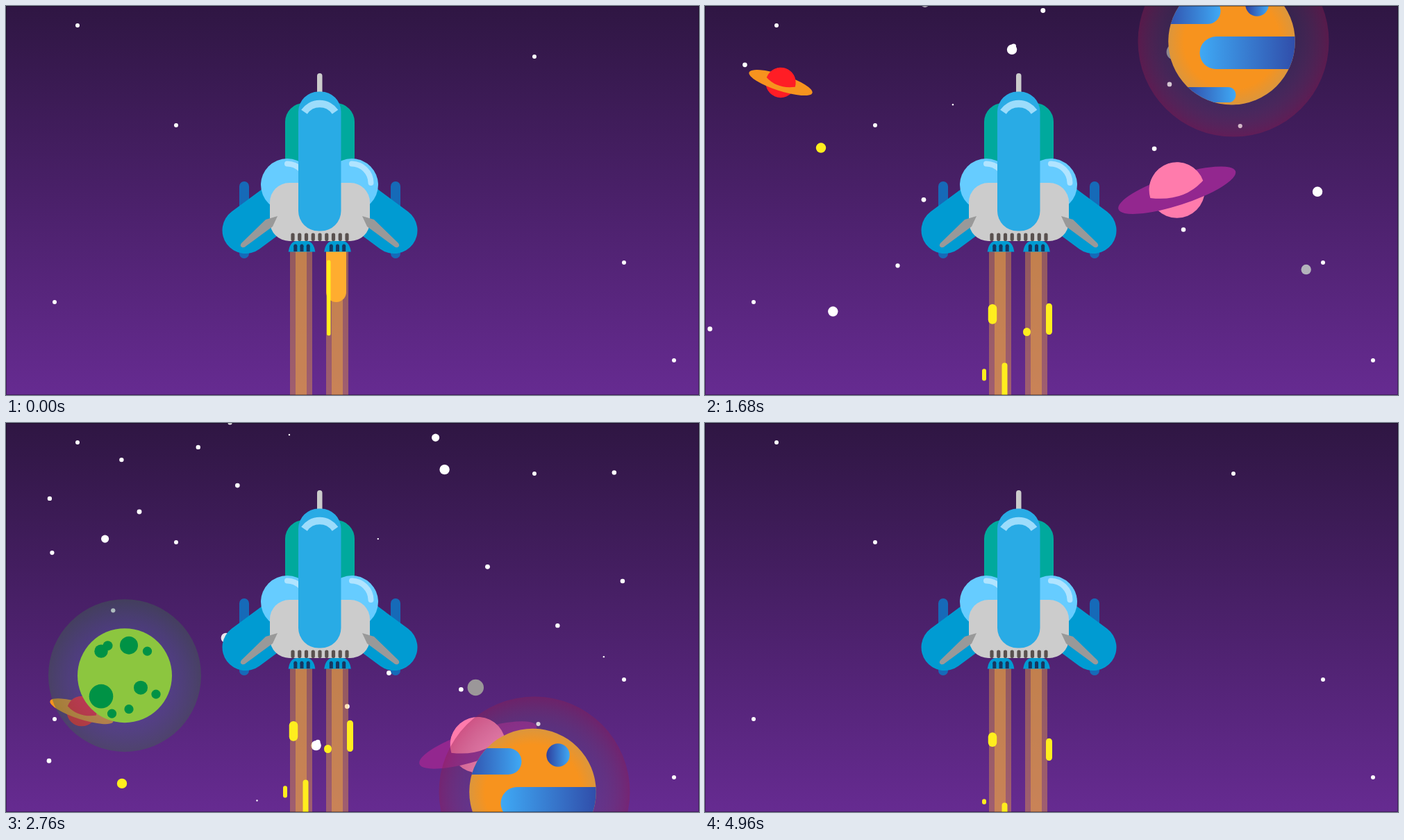
An HTML page that plays this animation: 998 by 561 pixels, repeating every 5000 ms.

```html
<!DOCTYPE html>
<html lang="en">
<head>
<meta charset="utf-8">
<title>Rocket flight</title>
<style>
html, body { margin: 0; width: 100%; height: 100%; overflow: hidden; background: #2f1642; }
svg { display: block; width: 100%; height: 100%; }
</style>
</head>
<body>
<svg viewBox="0 0 998 561" preserveAspectRatio="none">
  <defs>
    <linearGradient id="sky" x2="0" y2="1">
      <stop stop-color="#2f1643"/><stop offset="1" stop-color="#662b91"/>
    </linearGradient>
    <linearGradient id="sea">
      <stop stop-color="#3fa9f5"/><stop offset="1" stop-color="#2e3f9e"/>
    </linearGradient>
    <linearGradient id="bay">
      <stop stop-color="#2e3f9e"/><stop offset="1" stop-color="#3fa9f5"/>
    </linearGradient>
    <radialGradient id="sun">
      <stop offset=".75" stop-color="#f7931e"/><stop offset="1" stop-color="#dc963c"/>
    </radialGradient>
    <radialGradient id="warmHalo">
      <stop offset=".66" stop-color="#5a5a78" stop-opacity=".2"/>
      <stop offset="1" stop-color="#8c1e50" stop-opacity=".42"/>
    </radialGradient>
    <radialGradient id="coolHalo">
      <stop offset=".6" stop-color="#50649b" stop-opacity=".4"/>
      <stop offset="1" stop-color="#3c6450" stop-opacity=".45"/>
    </radialGradient>
    <clipPath id="disc"><circle r="91.3"/></clipPath>
    <g id="ringed">
      <circle r="40"/>
      <ellipse rx="88.6" ry="21.6" transform="rotate(-18)" style="fill:var(--ring)"/>
      <path d="M-38.4 11.2A40 40 0 0 1 37.5 -14Q10 17 -38.4 11.2Z"/>
    </g>
    <g id="wing">
      <rect x="336" y="253" width="14" height="111" rx="7" fill="#166ab8"/>
      <path d="M345 323.5L405 279" stroke="#009bd2" stroke-width="67" stroke-linecap="round"/>
    </g>
    <path id="strut" fill="#999" d="M391 303L374 308L339 342Q336 346 340 348Q343 349 346 346L384 318Z"/>
    <g id="bulb">
      <circle r="38" fill="#66ccff"/>
      <path d="M0 -30.5A28 28 0 0 1 27.5 -3" fill="none" stroke="#b0e4ff" stroke-width="8" stroke-linecap="round"/>
    </g>
    <g id="trail" fill="#fbb03b">
      <rect x="-16" y="350" width="32" height="212" opacity=".38"/>
      <rect x="-8" y="350" width="16" height="212" opacity=".45"/>
    </g>
    <g id="nozzle">
      <path d="M-19.3 354.5Q-17 339 -7 339H7Q17 339 19.3 354.5Z" fill="#009bd2"/>
      <path d="M-9.2 354V346M0 354V346M9.2 354V346" stroke="#17365f" stroke-width="5"/>
      <path d="M-9.2 346V346M0 346V346M9.2 346V346" stroke="#17365f" stroke-width="5" stroke-linecap="round"/>
    </g>
  </defs>

  <rect width="998" height="561" fill="url(#sky)"/>
  <g id="stars" fill="#fff"></g>
  <g id="dots"></g>
  <g id="pink" fill="#ff7bac" style="--ring:#93278f"><use href="#ringed"/></g>
  <g id="red" fill="#ff1d25" style="--ring:#f7931e"><use href="#ringed" transform="scale(-.54 .54)"/></g>

  <g id="orange">
    <circle cx="2.5" r="137.5" fill="url(#warmHalo)"/>
    <circle r="91.3" fill="url(#sun)"/>
    <g clip-path="url(#disc)" fill="url(#bay)">
      <rect x="-107" y="-63" width="91" height="38" rx="19"/>
      <rect x="-46" y="-7" width="160" height="47" rx="23.5" fill="url(#sea)"/>
      <rect x="-75" y="66" width="81" height="22" rx="11"/>
      <circle cx="36.5" cy="-53" r="16.7"/>
    </g>
  </g>

  <g id="green">
    <circle r="110" fill="url(#coolHalo)"/>
    <circle r="68" fill="#8cc63f"/>
    <g fill="#009245">
      <circle cx="-34" cy="-35" r="9.7"/><circle cx="-24.5" cy="-43" r="7"/>
      <circle cx="6" cy="-43.5" r="13"/><circle cx="32.5" cy="-35" r="6.6"/>
      <circle cx="-34" cy="30" r="17.3"/><circle cx="23" cy="17.5" r="10"/>
      <circle cx="45" cy="27" r="6.6"/><circle cx="-18.5" cy="55" r="6.6"/>
      <circle cx="6" cy="48.5" r="6.6"/>
    </g>
  </g>

  <use href="#trail" x="425"/>
  <use href="#trail" x="477"/>
  <g id="fire"></g>

  <use href="#wing"/>
  <use href="#wing" transform="matrix(-1 0 0 1 904 0)"/>
  <rect x="448" y="97" width="7.5" height="40" rx="3.7" fill="#ccc"/>
  <rect x="402" y="140" width="100" height="150" rx="27" fill="#00a99d"/>
  <use href="#bulb" x="405" y="258"/>
  <use href="#bulb" x="498" y="258"/>
  <use href="#nozzle" x="426"/>
  <use href="#nozzle" x="477.5"/>
  <rect x="380" y="255" width="144" height="84" rx="28" fill="#ccc"/>
  <g id="slots" fill="#59514f"></g>
  <rect x="421" y="123.5" width="61.5" height="201" rx="29" fill="#29abe5"/>
  <path d="M429.5 152.8A27 27 0 0 1 474 152.8" fill="none" stroke="#9cdcfb" stroke-width="10.5"/>
  <use href="#strut"/>
  <use href="#strut" transform="matrix(-1 0 0 1 904 0)"/>
  <rect x=".5" y=".5" width="997" height="560" fill="none" stroke="#000" stroke-opacity=".35"/>
</svg>
<script>
const LOOP = 5000, STEP = 40, BURN = 9;
const NOZZLE = 337;
const $ = id => document.getElementById(id);

function add(parent, tag, attrs) {
  const el = document.createElementNS("http://www.w3.org/2000/svg", tag);
  for (const k in attrs) el.setAttribute(k, attrs[k]);
  return $(parent).appendChild(el);
}
const dot = (parent, r, fill, cx = 0, cy = 0) => add(parent, "circle", { cx, cy, r, fill });

let seed = 7;
const rand = () => (seed = seed * 16807 % 2147483647) / 2147483647;

// Everything that falls: place at time 0 and speed in px per ms
const movers = [];
const drift = (el, x, y, vy, vx = 0) => movers.push({ el, x, y, vx, vy });
const driftStar = (x, y, r) => drift(dot("stars", r, "#fff"), x, y, .3725, .0042);

// Fixed stars
for (const [x, y] of [[103, 28], [761, 73], [245, 172], [890, 370], [70, 427], [962, 511]])
  dot("stars", 3, "#fff", x, y);

// Small stars, getting denser along the way
const COUNT = 46;
for (let i = 0; i < COUNT; i++)
  driftStar(935 * rand(), -160 - 1100 * (i / COUNT) ** .65, i % 8 == 7 ? 1.2 : 3 + rand() / 2);

// Bright stars
for (const [x, y] of [[875, -358], [435, -563], [620, -961]]) driftStar(x, y, 7.2);
for (const [x, y] of [[466, -705], [131, -861], [607, -1007], [272, -1163]]) driftStar(x, y, 5.6);

// Moons
const moon = (x, y, fill, r = 7.2) => drift(dot("dots", r, fill), x, y, .292);
moon(184.3, -50, "#fff");
moon(865.7, -110.5, "#b3b3bb");
moon(167, -286, "#ffee1e");
moon(316.8, -496, "#e9e6ee");
moon(676.3, -424.4, "#9b9799", 11.7);

// Planets
drift($("pink"), 679.7, -43.4, .184);
drift($("red"), 109, -364, .2825);
drift($("orange"), 758.5, -697, .4453);
drift($("green"), 171, -1025.5, .5035);

for (let i = 0; i < 9; i++)
  add("slots", "rect", { x: 410.4 + i * 9.75, y: 327.5, width: 5.2, height: 11.5, rx: 2.2 });

// Exhaust
const blob = (x, lag) => ({ x, lag, el: add("fire", "rect", { fill: "#ffad2f" }) });
const blobs = [blob(475.5, 0), blob(424.5, 2)];

// Both ends of a streak reach y at step "life"; the upper end runs twice as fast
const streak = (x, w, y, speed, life, base = NOZZLE, start = 0) =>
  ({ x, w, y, speed, life, base, start, el: add("fire", "rect", { fill: "#ffee1e" }) });
const streaks = [
  streak(414, 12.5, 469, 16.4, 8),
  streak(431.5, 8, 657, 33, 10.2),
  streak(402, 6, 549, 19, 7.2, 409),
  streak(463.5, 10.8, 472, 9, 6.3, 410),
  streak(495.5, 9, 506, 26, 8.8),
  streak(464.8, 5.4, 576, 39, 5.3, NOZZLE, -2)
];

function capsule(el, x, w, top, end) {
  const h = end - top, show = h > 0 && w > 0;
  el.setAttribute("visibility", show ? "visible" : "hidden");
  if (!show) return;
  el.setAttribute("x", x - w / 2);
  el.setAttribute("y", top);
  el.setAttribute("width", w);
  el.setAttribute("height", h);
  el.setAttribute("rx", w / 2);
  el.setAttribute("ry", Math.min(w / 2, h / 2));
}

function burn(step) {
  const wrap = step >= 7 ? step - BURN : step;
  for (const { el, x, lag } of blobs) {
    const q = lag ? step - lag : wrap, age = Math.max(q, 0);
    const alive = q >= -1 && q < 4;
    const end = q < 0 ? 427 + 42 * q : 427 - 1.5 * q;
    capsule(el, x, alive ? 29 - 3 * age : 0, NOZZLE + 23.5 * age, end);
  }
  for (const { el, x, w, y, speed, life, base, start } of streaks) {
    const p = start < 0 ? wrap : step;
    const gap = speed * (life - p);
    const top = Math.max(base, y - gap - w / 2);
    const end = Math.min(y - gap / 2 + w / 2, base + 117 * (p - start));
    capsule(el, x, end - top < w - 1 ? 0 : w, top, end);
  }
}

function draw(now) {
  const frame = Math.floor((now % LOOP) / STEP), t = frame * STEP;
  for (const { el, x, y, vx, vy } of movers)
    el.setAttribute("transform", `translate(${x + vx * t} ${y + vy * t})`);
  burn(frame % BURN);
}

const begin = performance.now();
function tick() {
  draw(performance.now() - begin);
  requestAnimationFrame(tick);
}
tick();
</script>
</body>
</html>
```
